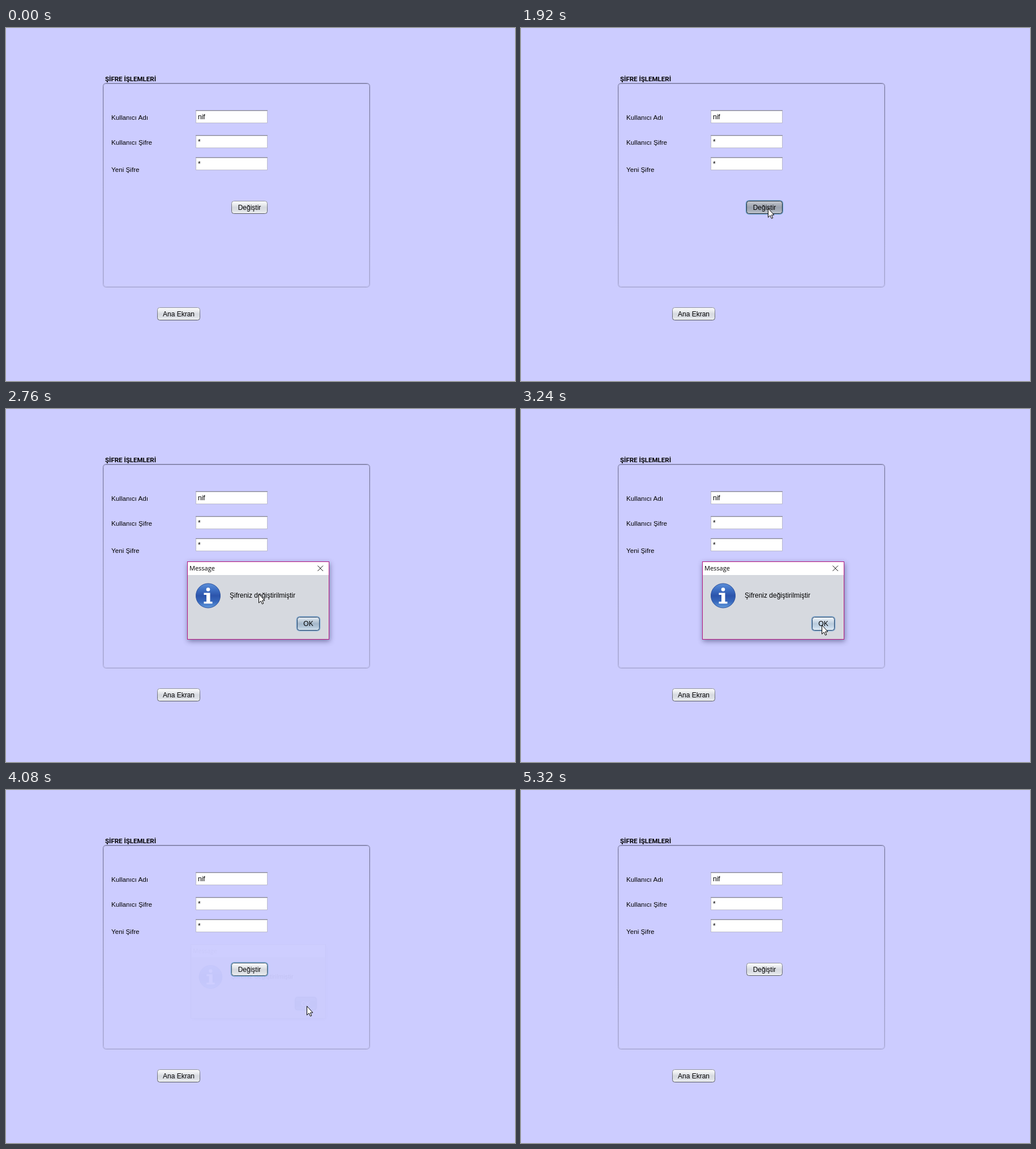
Animation of 899x623 px, one loop 5.4 s. Source, as an HTML page:

```html
<!DOCTYPE html>
<html lang="tr">
<head>
<meta charset="utf-8">
<title>Şifre</title>
<style>
  html, body { margin: 0; width: 100%; height: 100%; overflow: hidden; background: #ccf; }
  svg { display: block; }
  text { font: 12px "Liberation Sans", Arial, sans-serif; fill: #000; }
  text.label { font-size: 11.7px; }
  text.heading { font: bold 11.5px Roboto, sans-serif; }
  text.title { font: 11px "Open Sans", sans-serif; }
  .center { text-anchor: middle; }

  .button .ring { fill: none; stroke: none; stroke-width: 1.6; }
  .button .face { fill: url(#normal); stroke: url(#edge); }
  .button.hover .face { fill: url(#hover); }
  .button.focus .ring { stroke: #6ea3d0; }
  .button.focus .face { stroke: #46566a; }
  .button.down .face { fill: url(#down); stroke: #232c38; }
  .button.blue .ring { stroke: #7ba6cf; }
  .button.blue .face { fill: url(#blue); stroke: #2c4666; }
  .button.blue.hover .face { fill: url(#blueHover); }
  .button.blue.down .face { fill: url(#blueDown); stroke: #14273d; }
  .button.blue.down text { fill: #fff; }

  #dialog { transform-origin: 445px 338px; }
  .frame { fill: #d6d9df; stroke: #b5167f; filter: drop-shadow(1px 3px 5px rgba(0, 0, 40, .42)); }
  .inactive .frame { stroke: #85858f; filter: drop-shadow(1px 2px 4px rgba(0, 0, 40, .3)); }
  .inactive .title { fill: #999; }
  .inactive .close { display: none; }
</style>
</head>
<body>
<svg id="stage" width="899" height="623" viewBox="0 0 899 623"></svg>
<script>
const LOOP = 5400;

const gradient = (id, ...colors) => `<linearGradient id="${id}" x2="0" y2="1">${
  colors.map((c, i) => `<stop offset="${i / (colors.length - 1)}" stop-color="${c}"/>`).join("")
}</linearGradient>`;

const text = (x, y, value, cls = "") => `<text x="${x}" y="${y}" class="${cls}">${value}</text>`;

const field = (y, value) => `
  <rect x="335.5" y="${y + .5}" width="126" height="22" fill="#fff" stroke="#bcbccd"/>
  <path d="M335 ${y + .5}h127" stroke="#858593"/>
  <path d="M336 ${y + 1.5}h125" stroke="#d2d2da"/>
  ${text(339, y + 16, value)}`;

const button = (id, x, y, w, h, label, cls = "") => `
  <g id="${id}" class="button ${cls}">
    <rect class="ring" x="${x - .5}" y="${y - .5}" width="${w + 2}" height="${h + 2}" rx="5"/>
    <rect class="face" x="${x + .5}" y="${y + .5}" width="${w}" height="${h}" rx="4"/>
    ${text(x + w / 2 + .5, y + 16, label, "center")}
  </g>`;

document.getElementById("stage").innerHTML = `
  <defs>
    ${gradient("normal", "#fcfcfd", "#eceef0", "#d7dae0", "#dde0e5", "#f0f2f4")}
    ${gradient("hover", "#fff", "#f6f7f9", "#e4e7eb", "#eaedf0", "#fbfcfd")}
    ${gradient("down", "#c6cad1", "#b0b5be", "#9ba2ae", "#a6adb8", "#c2c8d0")}
    ${gradient("edge", "#92959f", "#555861")}
    ${gradient("blue", "#e6edf4", "#c4d1de", "#a4b7ca", "#b3c6d8", "#d6e5f2")}
    ${gradient("blueHover", "#f3f7fb", "#d6e1ec", "#b9cbdc", "#c7d8e8", "#e6f1fa")}
    ${gradient("blueDown", "#6d8dab", "#537797", "#3b6286", "#4a7296", "#7096b5")}
    ${gradient("panel", "#75759a", "#9191b8", "#a6a6d2")}
    ${gradient("info", "#5c8fd9", "#3f70c4", "#2c54ab", "#3768bc", "#629bdd")}
  </defs>

  <rect x="172.5" y="98.5" width="469" height="358" rx="5" fill="none" stroke="#b9b9e6"/>
  <rect x="171.5" y="97.5" width="471" height="360" rx="5" fill="none" stroke="url(#panel)"/>
  <path d="M175 98.5h464" stroke="#a2a2cb"/>
  ${text(175, 94, "ŞİFRE İŞLEMLERİ", "heading")}
  ${text(186, 161.5, "Kullanıcı Adı", "label")}
  ${text(186, 205.5, "Kullanıcı Şifre", "label")}
  ${text(186, 253.5, "Yeni Şifre", "label")}
  ${field(145, "nif")}
  ${field(189, "*")}
  ${field(228, "*")}
  ${button("change", 398, 305, 63, 22, "Değiştir")}
  ${button("home", 267, 493, 75, 22, "Ana Ekran")}

  <g id="dialog">
    <rect class="frame" x="320.5" y="269.5" width="250" height="137"/>
    <path d="M321 270h249v23h-249z" fill="#fff"/>
    ${text(324, 285, "Message", "title")}
    <path class="close" d="M550.5 276.5l9.5 9.5m0-9.5l-9.5 9.5" stroke="#111"/>
    <circle cx="357" cy="329.5" r="21.5" fill="url(#info)" stroke="#2c519e"/>
    <circle cx="357" cy="318.5" r="3.3" fill="#fff"/>
    <path d="M349.5 324.5h11v15.5h4v3.500h-15v-3.500h4.500v-12h-4.500z" fill="#fff"/>
    ${text(395, 333, "Şifreniz değiştirilmiştir")}
    ${button("ok", 514, 367, 39, 23, "OK", "blue")}
  </g>

  <path id="cursor" d="M.5 .5V16.200L4.100 12.800 6.500 18.200 8.800 17.200 6.500 12H11z" fill="#fff" stroke="#000"/>`;

const [change, ok, dialog, cursor] = ["change", "ok", "dialog", "cursor"].map(id => document.getElementById(id));

const linear = u => u;
const easeOut = u => 1 - (1 - u) ** 2;
const easeInOut = u => u * u * (3 - 2 * u);

// Each stroke of the pointer: evenly timed poses along a slightly bent line.
const strokes = [
  { start: 230, end: 680, poses: 7, from: [779, 602], to: [462, 371], bend: 15, ease: easeOut },
  { start: 980, end: 1520, poses: 8, from: [460, 363], to: [436, 317], bend: 0, ease: easeInOut },
  { start: 1760, end: 1761, poses: 2, from: [436, 318], to: [436, 318], bend: 0, ease: linear },
  { start: 2760, end: 3240, poses: 7, from: [446, 326], to: [531, 381], bend: 0, ease: easeInOut },
  { start: 4170, end: 4470, poses: 5, from: [555, 388], to: [775, 540], bend: 0, ease: linear },
  { start: 4540, end: 4940, poses: 6, from: [800, 558], to: [866, 625], bend: 0, ease: linear },
];

function pointer(t) {
  const s = strokes.findLast(s => t >= s.start);
  if (!s) return [899, 640];
  const n = s.poses - 1;
  const step = Math.min(n, Math.floor((t - s.start) / (s.end - s.start) * n + .001));
  const p = s.ease(step / n);
  const [x, y] = s.from.map((a, i) => a + (s.to[i] - a) * p);
  return [Math.round(x), Math.round(y + s.bend * 4 * p * (1 - p))];
}

// Start time, opacity and scale of the dialog.
const dialogPoses = [
  [0, 0, 1], [2150, .3, .94], [2230, .75, .975], [2310, .95, .993], [2390, 1, 1],
  [4030, .4, .975], [4080, .045, .95], [4170, 0, 1],
];

const start = performance.now();

function draw() {
  const t = (performance.now() - start) % LOOP;
  const between = (a, b) => t >= a && t < b;
  const [x, y] = pointer(t);
  const over = (left, top, right, bottom) => x >= left && x < right && y >= top && y < bottom;

  cursor.setAttribute("transform", `translate(${x} ${y})`);

  change.classList.toggle("hover", over(398, 305, 462, 328));
  change.classList.toggle("focus", between(1920, 5320));
  change.classList.toggle("down", between(1920, 2150));

  ok.classList.toggle("hover", over(514, 367, 554, 391));
  ok.classList.toggle("down", between(3760, 4170));

  const [, opacity, scale] = dialogPoses.findLast(p => t >= p[0]);
  dialog.style.opacity = opacity;
  dialog.style.transform = `scale(${scale})`;
  dialog.classList.toggle("inactive", t >= 3930);

  requestAnimationFrame(draw);
}
draw();
</script>
</body>
</html>
```
